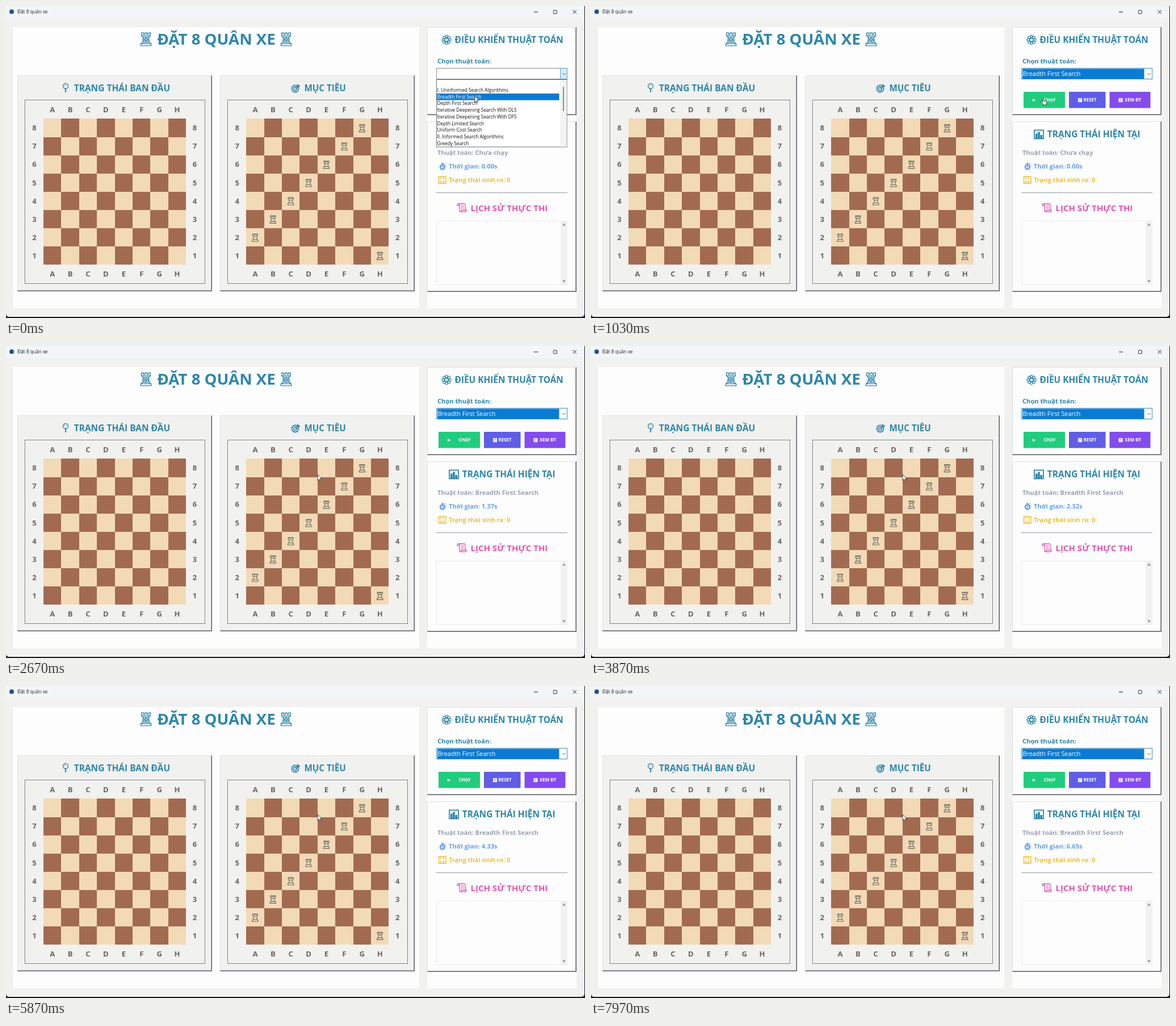
An HTML page for the animation above (8 s loop, 1020 px wide and 549 px high).

```html
<!DOCTYPE html>
<html lang="vi">
<head>
<meta charset="utf-8">
<style>
html, body { margin: 0; width: 1020px; height: 549px; overflow: hidden; background: #151a20; }
svg { display: block; font-family: "Open Sans", "Noto Sans", sans-serif; }
</style>
</head>
<body>
<svg id="stage" width="1020" height="549" viewBox="0 0 1020 549"></svg>
<script>
const TEAL = '#2e86ab', PINK = '#e754ae', BLUE = '#639ff0', GOLD = '#f0bf35', GREY = '#9aa2b1', INK = '#68645f';
const LOOP = 8000, CLOSE = 240, RUN = 1290;
const CRISP = 'shape-rendering="crispEdges"';

const rect = (x, y, w, h, fill, extra = '') =>
  `<rect x="${x}" y="${y}" width="${w}" height="${h}" fill="${fill}" ${extra}/>`;
const line = (d, color, width = 1, extra = '') =>
  `<path d="${d}" fill="none" stroke="${color}" stroke-width="${width}" ${extra}/>`;
const text = (s, x, y, size, color, weight = 700, extra = '') =>
  `<text x="${x}" y="${y}" font-size="${size}" fill="${color}" font-weight="${weight}" ${extra}>${s}</text>`;
const mid = (s, x, y, size, color) => text(s, x, y, size, color, 700, 'text-anchor="middle"');
const at = (x, y, body, scale = 1) => `<g transform="translate(${x} ${y}) scale(${scale})">${body}</g>`;
const dot = (x, y, r, fill, stroke = 'none', width = 1) =>
  `<circle cx="${x}" cy="${y}" r="${r}" fill="${fill}" stroke="${stroke}" stroke-width="${width}"/>`;

const ROOK = 'M-4.5-6.5h2v1.5h1.5v-1.5h2v1.5h1.5v-1.5h2v3l-1.7 1.5 .4 5 2 1.5v2h-10.4v-2l2-1.5 .4-5-1.7-1.5zM-2.8-2h5.6M-3.2 3h6.4';
const BRICKS = 'M-4.5-3.5h9M-3-.3h6M-3.1 1.3h6.2M0-2v1.7M-1.5-.3v1.6M1.5-.3v1.6M0 1.3v1.7M-5.2 4.5h10.4';

// Raised frame: pale top and left, two-tone shadow at bottom and right
function raised(x, y, w, h, fill) {
  return rect(x, y, w, h, '#5a5b5f', CRISP) +
    rect(x, y, w - 1, h - 1, '#e2e2e4', CRISP) +
    rect(x + 1, y + 1, w - 2, h - 2, '#a3a4a7', CRISP) +
    rect(x + 1, y + 1, w - 3, h - 3, fill, CRISP);
}

function board(x0, title, titleX, size, rooks) {
  let s = raised(x0, 122, 343, 380, '#f1f1ef') + text(title, titleX, 150, size, TEAL);
  s += rect(x0 + 14.5, 166.5, 317, 323, 'none', `stroke="#fff" ${CRISP}`);
  s += rect(x0 + 13.5, 165.5, 317, 323, 'none', `stroke="#777985" ${CRISP}`);
  const w = 31.4, h = 32.1, left = x0 + 46, top = 198.4;
  for (let i = 0; i < 8; i++) {
    const cx = left + w * (i + .5), cy = top + h * (i + .5);
    for (const y of [187.3, 476.3]) s += mid('ABCDEFGH'[i], cx, y, 13, INK);
    for (const x of [x0 + 30, x0 + 312.5]) s += mid(8 - i, x, cy + 4.8, 13, INK);
    for (let j = 0; j < 8; j++)
      s += rect(left + w * j, top + h * i, w, h, (i + j) % 2 ? '#a36a52' : '#f2dab7', CRISP);
  }
  if (rooks) for (let i = 0; i < 8; i++)
    s += at(left + w * ((14 - i) % 8 + .5), top + h * (i + .5) + .7, line(ROOK, '#66675f', 1.1));
  return s;
}

function flower() {
  let s = dot(0, 0, 3, 'none', TEAL, 1.3);
  for (let i = 0; i < 8; i++) {
    const a = i * Math.PI / 4;
    s += dot(6 * Math.cos(a), 6 * Math.sin(a), 2.1, 'none', TEAL, 1.2);
  }
  return s;
}

const target = dot(-.5, 1, 6, 'none', TEAL, 1.8) + dot(-.5, 1, 2.8, 'none', TEAL, 1.7) +
  line('M0 1L6-5M4-7v3.5h4', TEAL, 1.8);
const pin = dot(0, -3, 4.5, 'none', TEAL, 1.4) + line('M0 2V8', TEAL, 2) + line('M-2-3q0-2 2-2', TEAL, .9);
const chart = rect(-8, -7.5, 16, 15, 'none', `stroke="${TEAL}" stroke-width="1.8"`) +
  rect(-6, -1.5, 3.6, 9, TEAL) + rect(-1.8, -4.5, 3.6, 12, TEAL) + rect(2.4, 1, 3.6, 6.5, TEAL);
const watch = dot(0, 1.2, 4, 'none', BLUE, 2.6) + line('M-2-5.3h4M0-5v2M3.6-3.6l1.4-1.2M0-1v2.4h2', BLUE, 1.5);
const digits = rect(-6, -6, 12.5, 12, 'none', `stroke="${GOLD}" stroke-width="1.5"`) +
  line('M-2.5-4v3M2.5-4v3M-2.5 1v3M2.5 1v3M-4-4h1.5M1-4h1.5M-4 4h3M1 4h3', GOLD, 1.4);
const scroll = line('M-4 5V-5q0-2-2-2h10q2 0 2 2V4M-6-7q-2 0-2 2v1h4M-4 5q0 2 2 2h8q2 0 2-2v-1H-1v1q0 2-2 2', PINK, 1.3) +
  line('M-1.5-4h5M-1.5-1.5h5M-1.5 1h5', PINK);
const miniIcon = hole => rect(-3.5, -3.5, 7, 7, '#fff') + line('M-2-1h4M-2 1.5h2', hole);

function button(x, w, color, label, labelX, icon) {
  return rect(x, 151, w, 28.5, color) + icon + text(label, labelX, 168.3, 7.9, '#fff');
}

const bigRook = x => at(x, 58.5, line(ROOK + BRICKS, TEAL, .8), 1.75);

const frame =
  '<path d="M0 0H1019V541q0 6-6 6H6q-6 0-6-6z" fill="#f1f1f0"/>' +
  rect(0, 0, 1019, 21, '#f3f6f8') +
  dot(10, 10, 4, '#27538c') + text('Đặt 8 quân xe', 20, 13.2, 8.3, '#222', 400) +
  line('M930 10.5h7M998.5 7l6.5 6.5M1005 7l-6.5 6.5', '#222') +
  rect(964.5, 7.5, 6, 6, 'none', 'stroke="#222" rx="1"') +
  rect(12, 37, 716, 495, '#fdfdfd') + rect(742, 37, 263, 495, '#fdfdfd') +
  bigRook(246.5) + bigRook(493.5) + text('ĐẶT 8 QUÂN XE', 266.5, 67.7, 27.6, TEAL) +
  board(20, 'TRẠNG THÁI BAN ĐẦU', 119.7, 15.5, false) + at(105, 144, pin) +
  board(377.2, 'MỤC TIÊU', 525.5, 15.2, true) + at(510, 144.5, target) +
  raised(742, 37, 263, 155, '#fdfdfd') + raised(742, 203, 263, 300, '#fdfdfd') +
  at(776, 59.5, flower()) + text('ĐIỀU KHIỂN THUẬT TOÁN', 790.5, 64.6, 15.4, TEAL) +
  text('Chọn thuật toán:', 760, 100.8, 11.15, TEAL) +
  button(762, 73, '#20cd7e', 'CHẠY', 797.5, '<path d="M778 163.3l5.5 2.5-5.5 2.5z" fill="#fff"/>') +
  button(842, 64.5, '#605de6', 'RESET', 867.5, at(861.5, 165.7, miniIcon('#605de6'))) +
  button(913.5, 72, '#844bed', 'XEM ĐT', 940, at(933, 165.7, miniIcon('#844bed'))) +
  at(789, 226, chart) + text('TRẠNG THÁI HIỆN TẠI', 803.8, 231.3, 15.45, TEAL) +
  text('', 760, 262, 11, GREY, 700, 'id="algo"') +
  at(769, 282, watch) + text('', 780, 286, 11.2, BLUE, 700, 'id="time"') +
  at(768.5, 306, digits) + text('Trạng thái sinh ra: 0', 780, 310, 11, GOLD) +
  line('M758 328.5H989', '#b0b2bd', 1.3) +
  at(803, 355, scroll) + text('LỊCH SỬ THỰC THI', 818.5, 360.5, 15, PINK) +
  rect(758.5, 378.5, 230, 112, '#fdfdfd', 'stroke="#ececee"') + rect(977, 379, 12, 111, '#f1f1f1') +
  '<path d="M980 386.5l3-4.5 3 4.5zM980 482.5l3 4.5 3-4.5z" fill="#9a9a9c"/>';

const chevron = line('M980.3 118.2l2.7 2.7 2.7-2.7', '#555');
const closedBox = '<g id="closed">' +
  rect(758.5, 109.5, 230, 19, '#fff', 'stroke="#3c8ccb"') + rect(760, 110.5, 214.5, 17.5, '#0a7bd3') +
  text('Breadth First Search', 760.5, 123.4, 10.85, '#fff', 400) + chevron + '</g>';

const ITEMS = ['I. Uninformed Search Algorithms', 'Breadth First Search', 'Depth First Search',
  'Iterative Deepening Search With DLS', 'Iterative Deepening Search With DFS', 'Depth Limited Search',
  'Uniform Cost Search', 'II. Informed Search Algorithms', 'Greedy Search'];
const openBox = '<g id="open">' +
  rect(758.5, 109.5, 230, 19, '#fff', 'stroke="#8b8d90"') +
  rect(976.5, 109.5, 12, 19, '#d5eaf8', 'stroke="#5d9dc8"') + chevron +
  rect(758.5, 129.5, 229.5, 118.5, '#fff', 'stroke="#6f7175"') + rect(976, 130, 11.5, 117.5, '#f3f3f3') +
  rect(981, 142, 2, 43, '#8c8c8c', 'rx="1"') + rect(759, 154, 215.5, 11.7, '#0a7bd3') +
  ITEMS.map((s, i) => text(s, 759.5, 151 + i * 11.7, 8.25, i === 1 ? '#fff' : '#111', 400)).join('') + '</g>';

const pointer = '<g id="pointer"><g id="arrow"><path d="M0 0V10.5l2.4-2.2 1.7 3.8 1.7-.8-1.6-3.6h3.3z" fill="#fff" stroke="#222" stroke-width=".8"/></g>' +
  '<g id="hand"><path d="M-1 .8q1-1.6 2 0V5l4 .8q1.6.3 1.4 2L5.6 12H.4L-3 8q-.6-1.6 1-1.4l1 .8z" fill="#fff" stroke="#222" stroke-width=".9"/></g></g>';

const $ = id => document.getElementById(id);
$('stage').innerHTML = frame + closedBox + openBox + pointer;
const show = (id, on) => $(id).setAttribute('visibility', on ? 'visible' : 'hidden');

// The clock label refreshes in uneven batches: [start, step, count]
const ticks = [0];
for (const [start, step, count] of [[.17, .3, 4], [1.37, .3167, 3], [2.32, .285, 4], [3.46, .29, 12]])
  for (let i = 0; i < count; i++) ticks.push(start + i * step);

const ease = (t, a, b) => {
  const p = Math.min(1, Math.max(0, (t - a) / (b - a)));
  return p * p * (3 - 2 * p);
};

function draw(t) {
  const open = t < CLOSE, running = t >= RUN;
  show('open', open);
  show('closed', !open);
  $('algo').textContent = 'Thuật toán: ' + (running ? 'Breadth First Search' : 'Chưa chạy');
  const shown = ticks.filter(v => v <= Math.max(0, (t - RUN) / 1000)).pop();
  $('time').textContent = `Thời gian: ${shown.toFixed(2)}s`;

  const toButton = ease(t, 300, 800), toBoard = ease(t, 1450, 2150);
  const x = 825.5 - 29 * toButton - 247.5 * toBoard;
  const y = 158.5 + 3.5 * toButton + 64 * toBoard;
  const over = !open && x > 762 && x < 835 && y > 151 && y < 179.5;
  $('pointer').setAttribute('transform', `translate(${x} ${y})`);
  show('hand', over);
  show('arrow', !over);
}

const begin = performance.now();
function tick() {
  draw((performance.now() - begin) % LOOP);
  requestAnimationFrame(tick);
}
tick();
</script>
</body>
</html>
```
